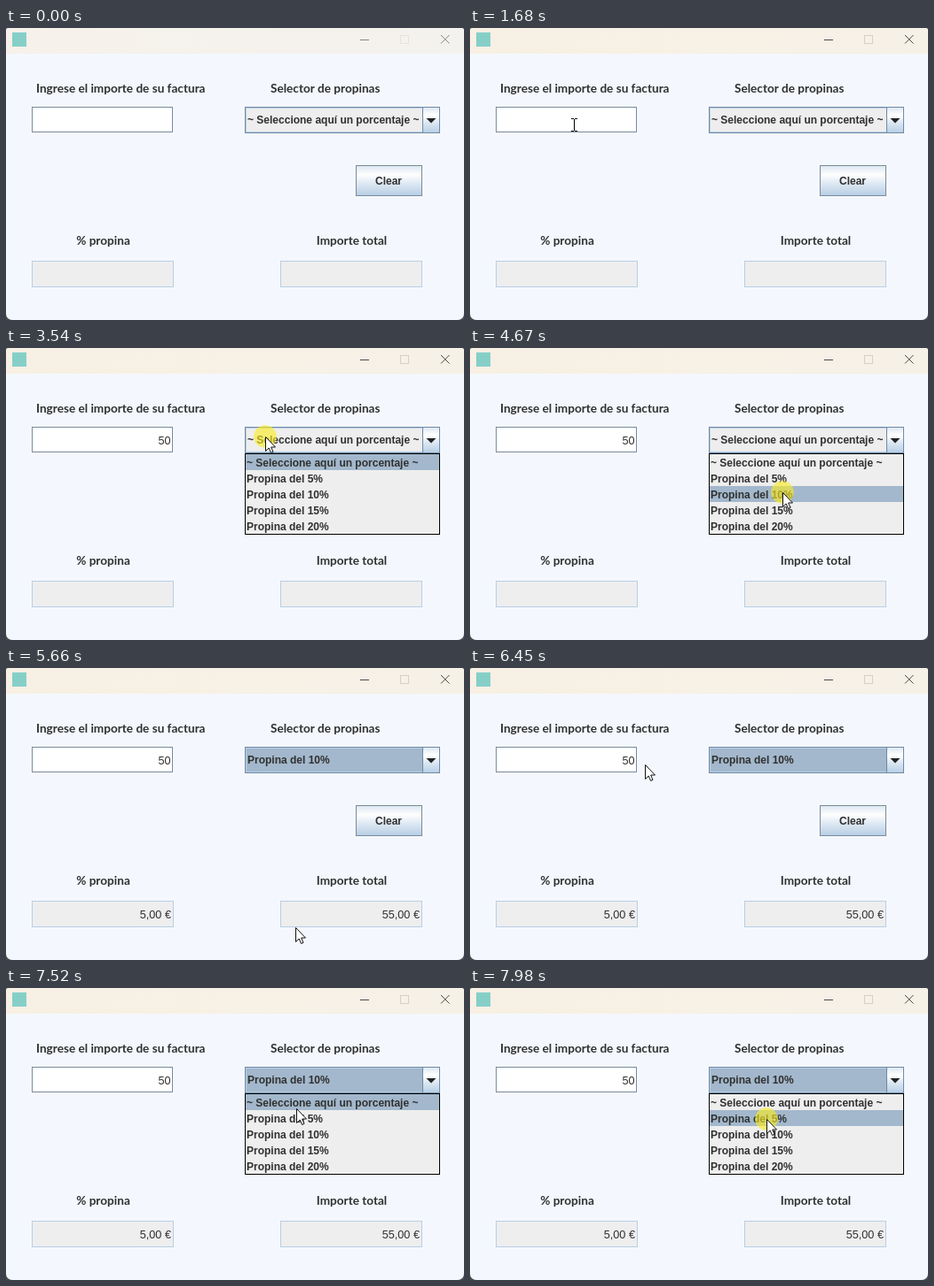
These frames come from a looping animation (516x330 px, 8 s). An HTML page with a canvas:

```html
<!DOCTYPE html>
<html lang="es">
<head>
<meta charset="utf-8">
<title>Calculadora de propinas</title>
<style>
  html, body { margin: 0; width: 100%; height: 100%; overflow: hidden; background: #4a4a4a; }
  canvas { display: block; }
</style>
</head>
<body>
<canvas id="stage" width="516" height="330"></canvas>
<script>
const ctx = document.getElementById('stage').getContext('2d');
const LOOP = 8000;
const LABEL = 'bold 13.6px Lato, sans-serif';
const BOLD = 'bold 12px "Liberation Sans", sans-serif';
const PLAIN = '12.7px "Liberation Sans", sans-serif';
const STEEL = '#7a8a99', SKY = '#b8cfe5', SELECTED = '#a3b8cc', PANEL = '#eeeeee', EDGE = '#6f8aa6';

const PROMPT = '~ Seleccione aquí un porcentaje ~';
const OPTIONS = [PROMPT, ...[5, 10, 15, 20].map(percent => `Propina del ${percent}%`)];
const ROW_TOP = 120, ROW_HEIGHT = 18;

// Times in ms
const CLICK = { field: 1340, open: 3540, pick: 4670, reopen: 7260, choose: 7980 };
const PRESS = 60, FIRST_KEY = 1940, KEY_GAP = 200, BLINK = 470;
const AMOUNT = '50';

// The pointer rests between glides
const ENTRY = { end: 70, x: 505, y: 322 };
const GLIDES = [
  { start: 70, end: 1210, x: 117, y: 110 },
  { start: 3070, end: 3470, x: 292, y: 100 },
  { start: 3930, end: 4130, x: 352, y: 163 },
  { start: 5000, end: 5190, x: 326, y: 293 },
  { start: 5660, end: 6450, x: 197, y: 109 },
  { start: 6520, end: 7180, x: 313, y: 105 },
  { start: 7400, end: 7520, x: 327, y: 136 },
  { start: 7600, end: 7960, x: 334, y: 148 }
];

function pointerAt(t) {
  let { x, y } = ENTRY;
  for (const glide of GLIDES) {
    const p = Math.min(1, Math.max(0, (t - glide.start) / (glide.end - glide.start)));
    const ease = p * p * (3 - 2 * p);
    x += (glide.x - x) * ease;
    y += (glide.y - y) * ease;
  }
  return { x, y };
}

function stateAt(t) {
  const typing = t - FIRST_KEY;
  const blink = Math.floor(Math.max(0, typing - KEY_GAP) / BLINK);
  const picked = t >= CLICK.pick + PRESS;
  return {
    active: t >= CLICK.field,
    amount: AMOUNT.slice(0, Math.max(0, Math.floor(typing / KEY_GAP) + 1)),
    caret: typing >= 0 && t < CLICK.open && blink % 2 === 0,
    choice: picked ? 2 : 0,
    open: t >= CLICK.open && !picked || t >= CLICK.reopen,
    pressed: Object.values(CLICK).some(click => t >= click && t < click + PRESS)
  };
}

function fill(x, y, w, h, color) {
  ctx.fillStyle = color;
  ctx.fillRect(x, y, w, h);
}

function box(x, y, w, h, color, border) {
  fill(x, y, w, h, border);
  fill(x + 1, y + 1, w - 2, h - 2, color);
}

function rounded(h, radii, color) {
  ctx.beginPath();
  ctx.roundRect(0, 0, 516, h, radii);
  ctx.fillStyle = color;
  ctx.fill();
}

function text(str, x, y, font, align = 'left') {
  ctx.font = font;
  ctx.textAlign = align;
  ctx.fillStyle = '#303030';
  ctx.fillText(str, x, y);
}

function trace(points) {
  ctx.beginPath();
  points.forEach(([x, y]) => ctx.lineTo(x, y));
}

function line(points, color) {
  trace(points);
  ctx.strokeStyle = color;
  ctx.stroke();
}

function shape(points, color) {
  trace(points);
  ctx.fillStyle = color;
  ctx.fill();
}

function gradient(x, y, stops) {
  const g = ctx.createLinearGradient(0, y[0], x, y[1]);
  stops.forEach(([offset, color]) => g.addColorStop(offset, color));
  return g;
}

const metal = (y, h) => gradient(0, [y, y + h],
  [[0, '#dde8f3'], [.3, '#ffffff'], [.6, '#dde8f3'], [1, SKY]]);

function drawWindow(active) {
  fill(0, 0, 516, 330, '#4a4a4a');
  rounded(330, [3, 3, 7, 7], '#f4f8fe');
  const [left, right] = active ? ['#f8f0e4', '#f6f1e7'] : ['#f6f1ea', '#f4f2ee'];
  rounded(29, [3, 3, 0, 0], gradient(516, [0, 0], [[0, left], [1, right]]));
  fill(7, 5, 16, 16, '#86cfc9');

  const ink = active ? '#484848' : '#858585';
  line([[399, 13.5], [409, 13.5]], ink);
  ctx.strokeStyle = active ? '#d3d0ca' : '#e6e3de';
  ctx.strokeRect(444.5, 8.5, 9, 9);
  line([[490, 8], [499.5, 17.5]], ink);
  line([[499.5, 8], [490, 17.5]], ink);
}

function drawForm({ amount, caret, choice }) {
  text('Ingrese el importe de su factura', 34, 73, LABEL);
  text('Selector de propinas', 298, 73, LABEL);
  text('% propina', 109.5, 245, LABEL, 'center');
  text('Importe total', 389.5, 245, LABEL, 'center');

  box(29, 89, 159, 29, '#ffffff', STEEL);
  text(amount, 185.5, 109, PLAIN, 'right');
  if (caret) fill(185, 96, 1, 16, '#333333');

  [[29, '5,00 €'], [309, '55,00 €']].forEach(([x, result]) => {
    box(x, 263, 160, 30, PANEL, SKY);
    if (choice) text(result, x + 157, 283, PLAIN, 'right');
  });

  box(394, 155, 75, 35, metal(156, 33), STEEL);
  text('Clear', 431, 177, BOLD, 'center');

  box(269, 89, 220, 30, SKY, EDGE);
  fill(271, 91, 198, 26, choice ? SELECTED : PANEL);
  box(469, 89, 20, 30, metal(90, 28), EDGE);
  shape([[473.5, 102], [484.5, 102], [479, 107.5]], '#222222');
  text(OPTIONS[choice], 272, 108, BOLD);
}

function drawPopup(choice, y) {
  const hovered = y < ROW_TOP ? choice : Math.floor((y - ROW_TOP) / ROW_HEIGHT);
  box(269, 119, 220, 92, PANEL, '#000000');
  fill(270, ROW_TOP + hovered * ROW_HEIGHT, 218, ROW_HEIGHT, SELECTED);
  OPTIONS.forEach((option, i) => text(option, 271, ROW_TOP + 14 + i * ROW_HEIGHT, BOLD));
}

function drawTextCursor() {
  fill(0, -7, 1, 13, '#000000');
  for (const end of [-8, 6]) {
    fill(-3, end, 3, 1, '#000000');
    fill(1, end, 3, 1, '#000000');
  }
}

function drawArrow() {
  const arrow = [[.5, .5], [.5, 16.5], [4.2, 13], [6.6, 18.5], [9, 17.4], [6.7, 12], [11.5, 12], [.5, .5]];
  shape(arrow, '#ffffff');
  line(arrow, '#111111');
}

function drawPointer(x, y, pressed) {
  if (pressed) {
    ctx.beginPath();
    ctx.arc(x, y, 12.8, 0, Math.PI * 2);
    ctx.fillStyle = 'rgba(250, 235, 30, .62)';
    ctx.fill();
  }
  const overField = x > 29 && x < 188 && y > 89 && y < 118;
  ctx.save();
  ctx.translate(Math.round(x), Math.round(y));
  overField ? drawTextCursor() : drawArrow();
  ctx.restore();
}

function draw(t) {
  const state = stateAt(t);
  const { x, y } = pointerAt(t);
  drawWindow(state.active);
  drawForm(state);
  if (state.open) drawPopup(state.choice, y);
  if (t >= ENTRY.end) drawPointer(x, y, state.pressed);
}

const start = performance.now();
function tick() {
  draw((performance.now() - start) % LOOP);
  requestAnimationFrame(tick);
}
tick();
</script>
</body>
</html>
```
